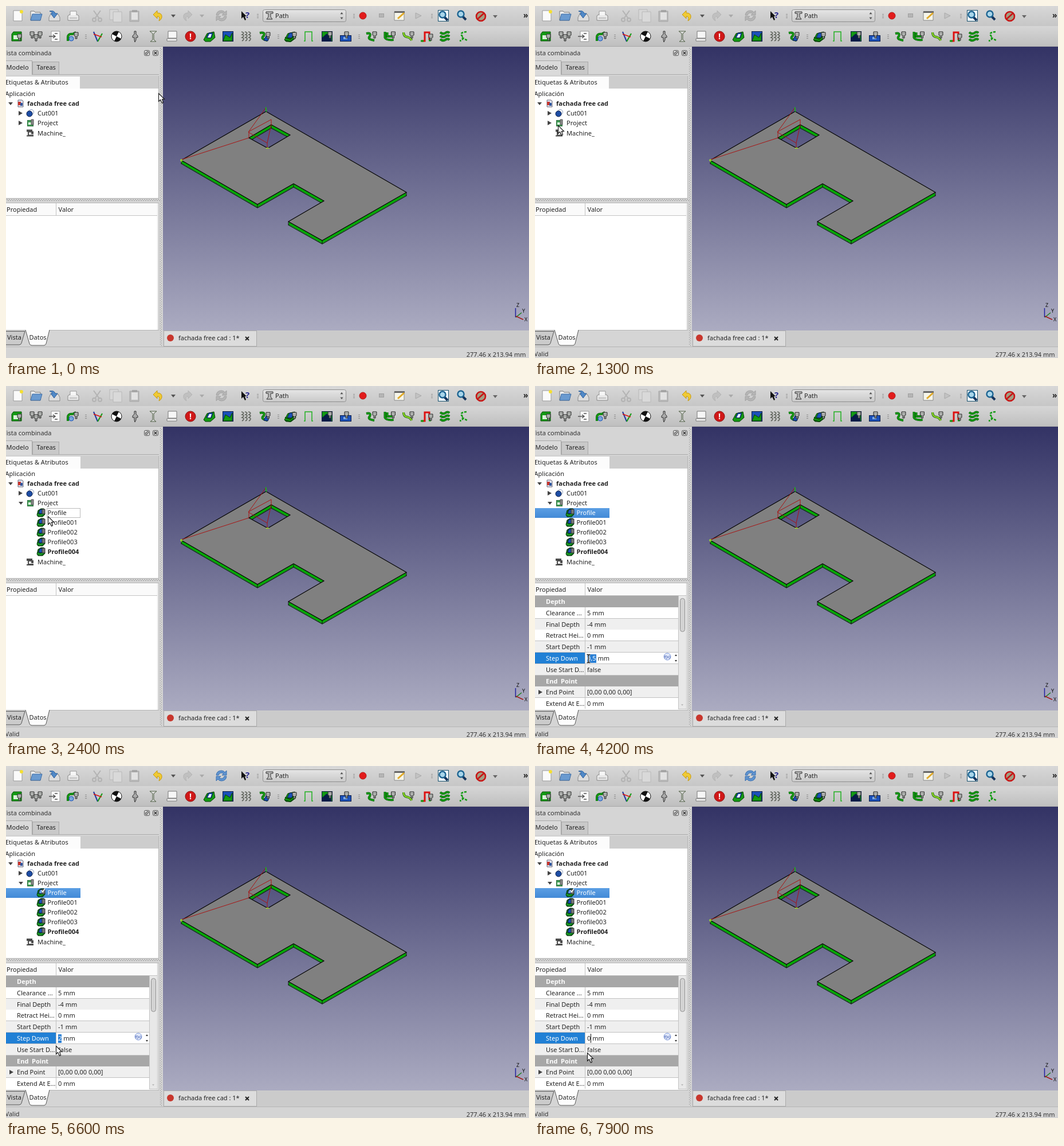
An HTML page with a canvas that plays this animation: 913 by 614 pixels, repeating every 8000 ms.

```html
<!DOCTYPE html>
<html lang="es">
<head>
<meta charset="utf-8">
<style>
html, body { margin: 0; width: 100%; height: 100%; overflow: hidden; background: #d4d4d4 }
canvas { display: block }
</style>
</head>
<body>
<canvas id="stage" width="913" height="614"></canvas>
<script>
const c = document.getElementById('stage').getContext('2d');
const GREEN = '#139a13', BLUE = '#1b50b8', NAVY = '#0a1c48', GRAY = '#b3b3b3', DARK = '#333';

// ---------- drawing helpers ----------
function box(x, y, w, h, fill, stroke) {
  if (fill) { c.fillStyle = fill; c.fillRect(x, y, w, h); }
  if (stroke) { c.strokeStyle = stroke; c.lineWidth = 1; c.strokeRect(x + .5, y + .5, w - 1, h - 1); }
}
function text(str, x, y, color = '#222', { bold = false, size = 11, align = 'left' } = {}) {
  c.font = `${bold ? 'bold ' : ''}${size}px "Noto Sans", "Open Sans", sans-serif`;
  c.textAlign = align;
  c.fillStyle = color;
  c.fillText(str, x, y);
}
function shape(x, y, d, fill, stroke, width = 1) {
  const path = new Path2D(d);
  c.save();
  c.translate(x, y);
  if (fill) { c.fillStyle = fill; c.fill(path); }
  if (stroke) { c.strokeStyle = stroke; c.lineWidth = width; c.stroke(path); }
  c.restore();
}
function disc(x, y, r, fill, stroke, width = 1) {
  c.beginPath();
  c.arc(x, y, r, 0, 7);
  if (fill) { c.fillStyle = fill; c.fill(); }
  if (stroke) { c.strokeStyle = stroke; c.lineWidth = width; c.stroke(); }
}
function gradient(y, h, from, to) {
  const g = c.createLinearGradient(0, y, 0, y + h);
  g.addColorStop(0, from);
  g.addColorStop(1, to);
  return g;
}
const down = (x, y, color = '#555', s = 4) => shape(x, y, `M${-s} ${-s / 2}H${s}L0 ${s / 2 + 1}Z`, color);
const up = (x, y, color = '#555', s = 4) => shape(x, y, `M${-s} ${s / 2}H${s}L0 ${-s / 2 - 1}Z`, color);
const right = (x, y) => shape(x, y, 'M-3 -4L4 0L-3 4Z', '#444');
const page = (x, y, fill = '#fafafa', edge = '#999') => shape(x, y, 'M-7 -9H8V9H-7Z', fill, edge);

// ---------- toolbar icons ----------
function handle(x, y) { for (const d of [-3, 0, 3]) box(x - 1, y + d, 3, 1, '#8d8d8d'); }
function bit(x, y) {
  shape(x, y, 'M-3 -5H4V1H2V6H-1V1H-3Z', '#8b8f8b', DARK);
  shape(x, y, 'M-2 -3H3M-2 0H3', null, '#eee');
}
function greenBlock(x, y) {
  shape(x, y, 'M-10 6L-4 -5L8 -8L10 2L2 9L-7 9Z', GREEN, '#063d06');
  shape(x, y, 'M-5 2L-1 -6H6L3 3Z', BLUE, NAVY);
}
function scribble(x, y, d, color = GREEN) {
  shape(x, y, d, null, '#0a5a0a', 4);
  shape(x, y, d, null, color, 2.6);
}
function curvedArrow(x, y, color, edge, flip) {
  c.save();
  c.translate(x, y);
  c.scale(flip ? -1 : 1, 1);
  shape(0, 0, 'M-8 -2L-1 -9V-5Q8 -5 7 3Q6 7 2 9Q5 1 -1 1V5Z', color, edge);
  c.restore();
}
function refresh(x, y, active) {
  const color = active ? '#5f93cf' : '#b5b5b5', edge = active ? '#3a70b0' : '#a3a3a3';
  shape(x, y, 'M-9 -1Q-8 -9 0 -9Q4 -9 6 -6L9 -9V-1H1L4 -4Q-3 -7 -5 -1Z', color, edge);
  shape(x, y, 'M9 1Q8 9 0 9Q-4 9 -6 6L-9 9V1H-1L-4 4Q3 7 5 1Z', color, edge);
}
function magnifier(x, y) {
  shape(x, y, 'M2 2L8 8', null, '#17365e', 4);
  disc(x - 1, y - 2, 5.5, '#a8d5ea', '#1c6391', 2.4);
}

function topIcons(touched) {
  page(20, 17);
  disc(27, 10, 3, '#f5df32');
  shape(52, 17, 'M-9 8V-8H-3L-1 -6H8V8Z', '#eee', '#777');
  shape(52, 17, 'M-9 8L-6 -3H11L8 8Z', '#6a9ad0', '#3d6ca4');
  shape(84, 17, 'M-9 9V3L-6 -3H7L10 3V9Z', '#ddd', '#888');
  shape(84, 17, 'M-8 -8Q0 -10 2 -4H6L0 4L-6 -4H-3Q-3 -7 -8 -8Z', '#5089c8', '#2b5e9b');
  shape(117, 17, 'M-9 8V0L-6 -2H7L10 0V8Z', '#e8e8e8', '#888');
  shape(117, 17, 'M-5 -1V-8H6V-1M-6 4H7', '#f6f6f6', '#999');
  shape(159, 17, 'M-6 -9L4 5M6 -9L-4 5', null, GRAY, 2);
  disc(154, 24, 3, null, GRAY, 2);
  disc(164, 24, 3, null, GRAY, 2);
  page(188, 15, '#d7d7d7', '#b8b8b8');
  page(194, 19, '#d9d9d9', '#b8b8b8');
  shape(224, 17, 'M-8 -8H8V10H-8Z', '#b9b9b9', '#a5a5a5');
  box(219, 11, 11, 13, '#e2e2e2');
  box(220, 7, 9, 4, '#a5a5a5');
  curvedArrow(265, 17, '#f0ca35', '#c69a10');
  down(292, 17);
  curvedArrow(317, 17, '#c0c0c0', '#b4b4b4', true);
  down(342, 17, '#aaa');
  refresh(376, 17, touched);
  shape(411, 9, 'M0 0V13L3 10L6 16L8 15L6 9H9Z', '#111');
  text('?', 418, 21, '#25258c', { bold: true, size: 15 });
  handle(439, 17);

  c.beginPath();
  c.roundRect(448.5, 6.5, 145, 21, 3);
  c.fillStyle = gradient(6, 21, '#e6e6e6', '#cacaca');
  c.fill();
  c.strokeStyle = '#8f8f8f';
  c.lineWidth = 1;
  c.stroke();
  shape(460, 17, 'M-6 -7H6V-4H2V2L5 6H-5L-2 2V-4H-6Z', '#bbb', DARK);
  text('Path', 470, 21);
  up(586, 13, '#555', 2.5);
  down(586, 21, '#555', 2.5);
  handle(607, 17);
  disc(623, 17, 6, '#e21c1c', '#b01818');
  box(651, 13, 9, 7, '#b5b5b5', '#a0a0a0');
  shape(687, 17, 'M-9 -7H8V8H-9Z', '#f5f5ea', '#888');
  box(678, 9, 18, 3, '#666');
  shape(687, 17, 'M-3 5L8 -5', null, '#e0a928', 3);
  shape(719, 17, 'M-4 -5L6 0L-4 5Z', '#c3c3c3', '#a9a9a9');
  handle(743, 17);
  box(754, 7, 19, 20, '#f2f7fa', '#16506d');
  magnifier(763, 17);
  magnifier(795, 16);
  disc(829, 18, 8, '#a39e83', '#c81616', 2.6);
  shape(829, 18, 'M-6 5L6 -6', null, '#c81616', 2.6);
  down(854, 18, '#666');
  text('»', 903, 21, '#222', { bold: true, size: 14 });
}

function pathIcons() {
  shape(19, 53, 'M-9 -4L-6 -8H8V8H-9Z', GREEN, '#0b500b');
  box(13, 51, 8, 7, '#d8f0d8');
  bit(23, 54);
  bit(45, 50); bit(52, 55); bit(59, 50);
  page(86, 53);
  shape(84, 53, 'M-9 0H1M-2 -3L2 0L-2 3M1 5H6M1 -5H6', null, '#555', 1.5);
  scribble(116, 53, 'M-8 8V1Q-7 -5 0 -4L6 -7');
  disc(114, 57, 4, '#7ba7d8', BLUE);
  bit(122, 51);
  handle(139, 53);
  shape(160, 53, 'M0 9L-7 -8', null, '#2038a0', 2);
  shape(160, 53, 'M0 9L8 -5', null, GREEN, 2);
  shape(160, 53, 'M-7 -4L7 1', null, '#d11', 1.5);
  disc(193, 53, 9, '#fff', '#111');
  c.save();
  c.translate(193, 53);
  c.rotate(.45);
  shape(0, 0, 'M0 0V-9A9 9 0 0 0 -9 0ZM0 0V9A9 9 0 0 0 9 0Z', '#111');
  c.restore();
  shape(225, 53, 'M-1 -9H2V-4L5 -1V2H2V6L0 10L-1 6V2H-4V-1L-1 -4Z', '#aaa', DARK);
  shape(257, 53, 'M-6 -9H6L1 -5V6L5 9H-5L-1 6V-5Z', '#ddd', '#4c5c42');
  shape(290, 53, 'M-7 -9H8V3H-7ZM-9 4H8V8H-9Z', '#f6f6f6', '#777');
  disc(322, 53, 9, '#d01818', '#8b0d0d');
  text('!', 322, 58, '#fff', { bold: true, size: 14, align: 'center' });
  greenBlock(355, 53);
  shape(355, 53, 'M-3 2L0 -4H4L2 2Z', '#eef');
  box(378, 44, 19, 18, BLUE, NAVY);
  shape(387, 53, 'M-8 8L-4 -3L4 2L8 -6V8Z', GREEN, '#063d06');
  for (const x of [413, 419, 425])
    shape(x, 53, 'M-2 -8Q5 -6 -1 -3Q5 -1 -1 2Q5 4 -1 8', null, '#62665f', 1.7);
  scribble(451, 53, 'M-8 -6Q2 -8 -1 -1Q-8 4 5 7');
  shape(452, 55, 'M-2 5L2 -3L8 -1L5 6Z', BLUE, NAVY);
  bit(457, 51);
  handle(475, 53);
  greenBlock(496, 53);
  shape(496, 53, 'M-9 2L0 5L9 -2M-9 7L0 9L9 3', null, '#064b06', 2);
  bit(503, 51);
  shape(528, 53, 'M-8 8H-6V-8H6V8H8', null, '#21b021', 1.5);
  box(551, 44, 19, 18, GREEN, NAVY);
  shape(560, 53, 'M-8 8V2L0 -5L4 -1L8 -3V8Z', NAVY);
  bit(565, 50);
  box(583, 51, 20, 11, BLUE, NAVY);
  box(589, 54, 7, 4, '#7cabea');
  bit(594, 50);
  handle(616, 53);
  const dressups = ['M-8 -5Q1 -7 -2 0Q-7 5 6 7', 'M-8 -8V2Q-6 7 7 6M-4 -7V0H6', 'M-8 -7Q-8 0 -2 1T6 7'];
  dressups.forEach((d, i) => {
    scribble(637 + 32.5 * i, 53, d, i == 2 ? '#8bcf24' : GREEN);
    bit(643 + 32.5 * i, 50);
  });
  shape(734, 53, 'M-8 8H-3V-7H5V6', null, '#d11', 3);
  shape(734, 53, 'M-10 8H-5M4 7H8', null, GREEN, 3);
  bit(741, 54);
  for (const y of [-6, 0, 6]) scribble(766, 53 + y, 'M-8 -1Q-3 3 1 0T8 0');
  c.setLineDash([4, 2]);
  shape(798, 53, 'M6 -8Q-7 -7 -2 -1T-6 8M-2 2L7 7', null, GREEN, 2.7);
  c.setLineDash([]);
}

// ---------- 3D view ----------
const PLATE = 'M454 184L699 325L552 409L493 376L555 340L502 310L439 346L306 269Z' +
              'M463 207L496 225L457 248L424 230Z';
const plate = new Path2D(PLATE);

function view() {
  box(274, 71, 639, 495, gradient(71, 495, '#333365', '#ababc1'));
  shape(0, 6, PLATE, null, '#0a2a0a', 1.1);
  c.fillStyle = '#04aa04';
  for (let dy = 5; dy > 0; dy--) {
    c.save();
    c.translate(0, dy);
    c.fill(plate, 'evenodd');
    c.restore();
  }
  c.setLineDash([1, 2]);
  shape(0, 5, PLATE, null, '#045c04');
  c.setLineDash([]);
  c.fillStyle = '#808080';
  c.fill(plate, 'evenodd');
  shape(0, 0, PLATE, null, '#050505', 1.2);
  shape(0, 0, 'M306 269v6M439 346v6M502 310v6M493 376v6M552 409v6M699 325v6M463 207v6', null, '#111');
  shape(0, 0, 'M306 268L424 230V219L463 198V207L456 239L423 220L454 177M456 239V248', null, '#a81414');
  shape(.5, .5, 'M453 176L454 184', null, '#15bd15', 1.6);
  shape(0, 0, 'M304 269H309M306 267V272M454 248H459', null, '#a5e82b', 1.4);

  shape(0, 0, 'M889.5 543V527', null, '#2020a0', 1.5);
  shape(0, 0, 'M890 543L900 535', null, '#188018', 1.5);
  shape(0, 0, 'M890 541L903 547', null, '#a81818', 1.5);
  text('Z', 891, 525, '#111', { size: 9 });
  text('Y', 901, 535, '#111', { size: 9 });
  text('X', 905, 550, '#111', { size: 9 });
}

// ---------- left panel ----------
function profileIcon(x, y, touched) {
  shape(x, y, 'M-7 4L-5 -4L0 -7H5L7 3L3 7H-5Z', '#0c6a18', '#06320b');
  shape(x, y, 'M-6 3L-1 5L6 1', null, '#1fae2c', 1.5);
  shape(x, y, 'M-4 1L-2 -5L3 -6V2Z', touched ? '#6c9dea' : BLUE, NAVY);
  shape(x + 4, y - 1, 'M-2 -5H3V3H-2Z', '#777', DARK);
  if (touched) shape(x, y, 'M1 -4L3 -1L7 -7', null, '#fff', 1.5);
}

function tree(expanded, selected, touched) {
  const header = expanded ? 130 : 129;
  box(0, 122, 267, 214, '#fff');
  box(0, 122, 267, 22, '#cdcdcd');
  box(266, 122, 1, 214, '#b5b5b5');
  box(0, 335, 267, 1, '#b5b5b5');
  box(0, 123, header, 21, '#fcfcfc');
  text('Etiquetas & Atributos', -1, 137);
  text('Aplicación', -1.5, 157);
  down(8, 170, '#444');
  shape(25, 170, 'M-4 -6H3L5 -4V6H-4Z', '#dfe4f0', '#667');
  box(21, 167, 5, 6, '#c8342c');
  box(25, 169, 4, 5, '#31559c');
  text('fachada free cad', 37, 174, '#222', { bold: true });
  right(25, 187);
  disc(44, 185, 4.5, '#fff', '#8a9bb8');
  disc(41, 188, 5, '#1d4da5', NAVY);
  text('Cut001', 55, 191);
  expanded ? down(26, 204, '#444') : right(25, 204);
  box(37, 199, 11, 11, '#3f9c55', '#2a6b3a');
  box(39, 203, 5, 4, '#dfd');
  shape(46, 203, 'M-2 -5H2V4H-2Z', '#888', '#555');
  text('Project', 55, 208);
  if (expanded) for (let i = 0; i < 5; i++) {
    const y = 221 + 17 * i, active = selected && i == 0;
    if (active) box(0, y - 8, 130, 17, gradient(y - 8, 17, '#5b9ee3', '#438ad7'));
    profileIcon(61, y, i == 0 && touched);
    text('Profile' + (i ? '00' + i : ''), 72.5, y + 4, active ? '#fff' : '#222', { bold: i == 4 });
  }
  if (expanded && !selected) {
    c.setLineDash([1, 1]);
    box(71, 213, 59, 17, null, '#777');
    c.setLineDash([]);
  }
  const y = expanded ? 307 : 221.5;
  shape(42, y, 'M-6 -6H4V-3H6V2H2V-1H-2V3H6V6H-6V4H-4V-2H-6Z', '#4c4c4c');
  text('Machine_', 55, y + 4);
}

const PROPERTIES = [
  ['Depth'], ['Clearance ...', '5 mm'], ['Final Depth', '-4 mm'], ['Retract Hei...', '0 mm'],
  ['Start Depth', '-1 mm'], ['Step Down'], ['Use Start D...', 'false'], ['End  Point'],
  ['End Point', '[0,00 0,00 0,00]'], ['Extend At E...', '0 mm'],
];

function stepEditor(t, y) {
  const value = t < 5500 ? '0,5' : t < 7200 ? '2' : t < 7900 ? '' : '0';
  const highlighted = t < 5100 || (t >= 5200 && t < 5500) || (t >= 6300 && t < 7200);
  const caret = (t >= 5500 && t < 5800) || t >= 7900;
  box(88, y - 14, 162, 19, '#fff');
  text(value, 91, y);
  const width = value ? c.measureText(value).width : 0;
  if (highlighted) {
    box(91, y - 11, Math.round(width), 15, '#2a7fd4');
    text(value, 91, y, '#fff');
  }
  text(' mm', 91 + width, y);
  if (caret) box(Math.round(91 + width), y - 12, 1, 16, '#111');
  disc(231, y - 7, 6, '#e3eafa', '#7a94d4');
  text('f(x)', 231, y - 4.5, '#2849a8', { size: 7, align: 'center' });
  up(246, y - 9, '#333', 2);
  down(246, y, '#333', 2);
}

function properties(t, selected) {
  box(0, 343, 267, 223, '#fff');
  box(0, 343, 267, 1, '#b5b5b5');
  box(266, 343, 1, 223, '#b5b5b5');
  box(0, 565, 267, 1, '#b5b5b5');
  box(264, 344, 1, 221, '#ddd');
  if (selected) {
    c.save();
    c.beginPath();
    c.rect(0, 365, 264, 198);
    c.clip();
    PROPERTIES.forEach(([name, value], i) => {
      const top = Math.round(366 + 19.8 * i), y = top + 14;
      if (i == 0 || i == 7) {
        box(0, top, 250, 20, '#a7a7a7');
        text(name, 19, y, '#fff', { bold: true });
        return;
      }
      box(0, top, 250, 20, i % 2 ? '#fff' : '#efefef');
      if (i == 5) box(0, top, 87, 20, '#2180d5');
      text(name, 19, y, i == 5 ? '#fff' : '#222');
      if (i == 5) stepEditor(t, y);
      else text(value, 91, y);
      box(0, top + 19, 250, 1, '#c1c1c1');
      box(87, top, 1, 20, '#c1c1c1');
    });
    right(9, 534);
    c.restore();
    box(250, 344, 15, 220, '#e8e8e8', '#c2c2c2');
    c.beginPath();
    c.roundRect(253.5, 370.5, 8, 58, 4);
    c.fillStyle = '#d3d3d3';
    c.fill();
    c.strokeStyle = '#909090';
    c.lineWidth = 1;
    c.stroke();
    up(257, 350, '#bbb', 2);
    down(257, 556, '#bbb', 2);
  }
  box(0, 344, 264, 21, '#fafafa');
  box(0, 365, 264, 1, '#c4c4c4');
  box(87, 344, 1, 22, '#c4c4c4');
  text('Propiedad', 1, 359);
  text('Valor', 91.5, 359);
}

function panelFrame() {
  box(0, 71, 274, 524, '#d5d5d5');
  text('Vista combinada', 79.5, 86, '#333', { align: 'right' });
  for (const x of [241, 256]) {
    c.beginPath();
    c.roundRect(x + .5, 77.5, 9, 9, 2);
    c.strokeStyle = '#555';
    c.lineWidth = 1;
    c.stroke();
  }
  shape(246, 82, 'M-2.5 -.5H.5V2.5H-2.5ZM-.5 -2.5H2.5V.5', null, '#444');
  shape(261, 82, 'M-2.5 -2.5L2.5 2.5M2.5 -2.5L-2.5 2.5', null, '#333', 1.5);
  box(46, 97, 47, 23, '#c9c9c9', '#a8a8a8');
  box(0, 119, 267, 1, '#ababab');
  box(-1, 95, 47, 25, '#dadada', '#a8a8a8');
  box(0, 119, 45, 1, '#dadada');
  text('Modelo', .5, 111);
  text('Tareas', 53.5, 111);
  for (let x = 1; x < 266; x += 4) { box(x, 337, 2, 1, '#999'); box(x + 2, 339, 2, 1, '#999'); }
  for (let y = 73; y < 592; y += 4) { box(269, y, 1, 2, '#aaa'); box(271, y + 2, 1, 2, '#aaa'); }
}

function bottomTabs() {
  shape(0, 0, 'M-2 567.5H33L27 588Q26 591 23 591H-2Z', '#cbcbcb', '#555');
  const side = 'M34 565L41 589Q42 592 45 592H66Q69 592 70 589L76 565';
  shape(0, 0, side, '#fdfdfd', '#555');
  text('Vista', 2, 582);
  text('Datos', 40.5, 582);
  box(274, 566, 639, 28, '#cbcbcb');
  box(275, 566, 163, 28, '#dcdcdc', '#aaa');
  disc(287, 579, 6, '#c8372d');
  text('fachada free cad : 1*', 301, 583);
  shape(421, 580, 'M-3 -3L3 3M3 -3L-3 3', null, '#222', 2);
  box(0, 594, 913, 20, '#d4d4d4');
  box(0, 594, 913, 1, '#b5b5b5');
  text('277.46 x 213.94 mm', 907.5, 612, '#333', { align: 'right' });
}

// ---------- pointer ----------
const TRACK = [
  [0, 266, 152], [700, 110, 200], [900, 71, 211], [1100, 23, 206], [1200, 23, 206], [1300, 40, 208],
  [1400, 23, 209], [2000, 23, 209], [2300, 68, 231], [2400, 73, 227], [4100, 73, 227],
  [6500, 92, 484], [6600, 87, 488], [6800, 87, 488], [6900, 100, 487], [7000, 100, 487],
  [7100, 96, 498], [7200, 91, 508], [7300, 91, 508], [7500, 91, 502], [7600, 91, 502],
  [7700, 91, 500], [8000, 91, 500],
];

function pointer(t) {
  if (t >= 4200 && t < 6500) {
    const x = t < 4700 ? 93 : t < 6000 ? null : t < 6300 ? 102 : 99;
    if (x) {
      const beam = 'M-3 -7H-1L0 -6L1 -7H3M0 -6V6M-3 7H-1L0 6L1 7H3';
      shape(x + .5, 475.5, beam, null, '#fff', 3);
      shape(x + .5, 475.5, beam, null, '#111', 1.4);
    }
    return;
  }
  const i = TRACK.findIndex(k => k[0] > t);
  const [t0, x0, y0] = TRACK[i - 1], [t1, x1, y1] = TRACK[i], k = (t - t0) / (t1 - t0);
  shape(Math.round(x0 + (x1 - x0) * k) + .5, Math.round(y0 + (y1 - y0) * k) + .5,
    'M0 0V14L3 11L6 17L8 16L6 10H10Z', '#fff', '#111', 1.1);
}

function render(ms) {
  const t = Math.floor(ms / 100) * 100;
  const selected = t >= 4200, touched = t >= 4700;
  box(0, 0, 913, 35, gradient(0, 35, '#d8d8d8', '#c6c6c6'));
  box(0, 35, 913, 36, gradient(35, 36, '#d6d6d6', '#bebebe'));
  box(0, 70, 913, 1, '#aaa');
  topIcons(touched);
  pathIcons();
  panelFrame();
  tree(t >= 1800, selected, touched);
  properties(t, selected);
  view();
  bottomTabs();
  if (t >= 300) text('Valid', 23.5, 611, '#333', { align: 'right' });
  pointer(t);
}

const start = performance.now();
function tick() {
  render((performance.now() - start) % 8000);
  requestAnimationFrame(tick);
}
tick();
</script>
</body>
</html>
```
